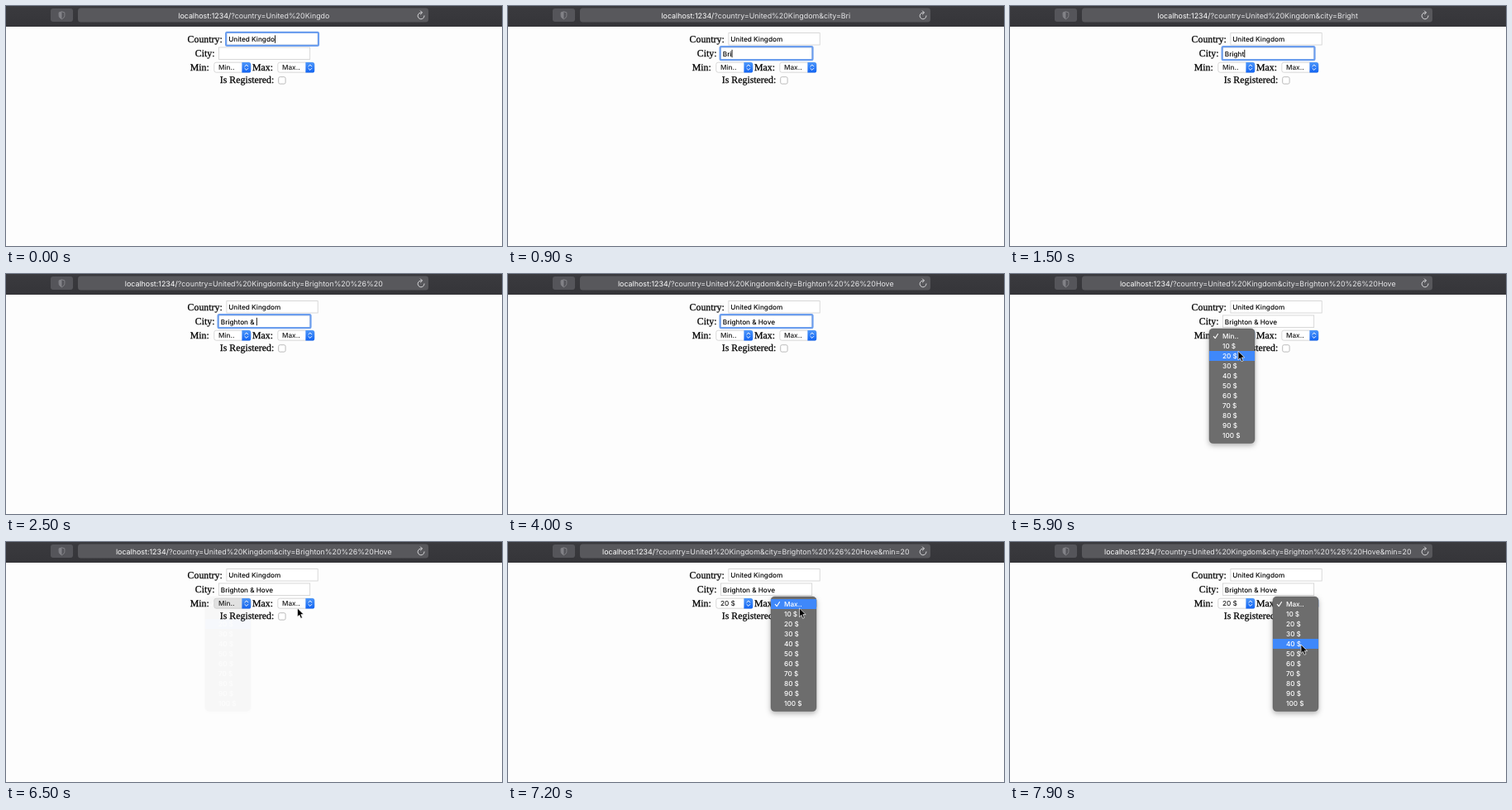
An HTML page that plays this animation: 600 px wide and 290 px high, repeating every 8 s.

```html
<!DOCTYPE html>
<html lang="en">
<head>
<meta charset="utf-8">
<title>Filter form</title>
<style>
html, body { margin: 0; width: 100%; height: 100%; overflow: hidden; background: #fdfdfd; }
svg { display: block; width: 600px; height: 290px; }
text { white-space: pre; text-rendering: geometricPrecision; font: 500 8.2px Inter, "Liberation Sans", sans-serif; fill: #000; }
.label { font: 11.85px "Liberation Serif", serif; stroke: #000; stroke-width: .25; }
.url { font-size: 8.88px; font-weight: 400; fill: #e6e6e8; text-anchor: middle; }
.host { fill: #fff; }
.value { fill: #1c1c1c; }
.menu text { fill: #fff; }
.box { fill: #fff; stroke: #cfcfcf; stroke-width: .8; }
.ring { fill: none; stroke: #6c9eee; stroke-width: 2.2; }
.line { fill: none; stroke-linecap: round; stroke-linejoin: round; }
</style>
</head>
<body>
<svg viewBox="0 0 600 290">
  <defs>
    <linearGradient id="bar" x2="0" y2="1">
      <stop offset="0" stop-color="#3a3a3e"/><stop offset="1" stop-color="#353539"/>
    </linearGradient>
    <linearGradient id="blue" x2="0" y2="1">
      <stop offset="0" stop-color="#4f98fa"/><stop offset="1" stop-color="#1264f2"/>
    </linearGradient>
    <filter id="shadow" x="-30%" y="-15%" width="160%" height="135%">
      <feDropShadow dx="0" dy="2.5" stdDeviation="3" flood-color="#000" flood-opacity=".3"/>
    </filter>
  </defs>

  <rect width="600" height="290" fill="#fdfdfd"/>
  <rect width="600" height="25" fill="url(#bar)"/>
  <rect x="54" y="3" width="27" height="16" rx="3" fill="#55555a"/>
  <path d="M67.5 6.8l3.4 1.1v3.4c0 2.2-1.5 3.6-3.4 4.5-1.9-.9-3.4-2.3-3.4-4.5V7.9z" fill="none" stroke="#8e8e93" stroke-width=".8"/>
  <path d="M67.5 6.8v9c-1.9-.9-3.4-2.3-3.4-4.5V7.9z" fill="#828287"/>
  <rect x="87" y="2.5" width="424" height="17" rx="3.5" fill="#58585c"/>
  <text class="url" x="299.8" y="15.2"><tspan class="host">localhost:1234/</tspan><tspan id="query"></tspan></text>
  <path class="line" d="M503 8.1a3.9 3.9 0 1 0 3 3.8M501.4 5.9l2.1 2.1-2.1 2.1" stroke="#e4e4e6" stroke-width=".9"/>

  <text class="label" x="219.6" y="44">Country:</text>
  <text class="label" x="228.8" y="61">City:</text>
  <text class="label" x="222.8" y="77.6">Min:</text>
  <text class="label" x="298" y="77.6">Max:</text>
  <text class="label" x="258.8" y="93.4">Is Registered:</text>
  <rect class="box" x="329.7" y="85.7" width="8.4" height="8.4" rx="1.8" style="stroke:#aaa"/>

  <g id="fields"></g>
  <rect id="caret" width=".9" height="9.4" fill="#000"/>
  <g id="selects"></g>
  <g id="menus"></g>
  <path id="arrow" d="M0 0v10.6l2.4-2.3 1.7 4 1.9-.8-1.7-3.9h3.4z" fill="#000" stroke="#fff" stroke-width=".7" stroke-linejoin="round"/>
</svg>
<script>
const LOOP = 8000, STEP = 100, GAP = 77, ROW = 12, TOP = 69;
const $ = id => document.getElementById(id);
const add = (parent, html) => {
  parent.insertAdjacentHTML("beforeend", html);
  return parent.lastElementChild;
};
const show = (el, on) => el.setAttribute("visibility", on ? "visible" : "hidden");
const within = (t, a, b) => t >= a && t < b;

const makeField = (x, y) => {
  const g = add($("fields"), `<g>
    <rect class="box" x="${x}" y="${y}" width="110.3" height="14.4"/>
    <rect class="ring" x="${x - .8}" y="${y - .8}" width="111.9" height="16" rx="1.4"/>
    <text x="${x + 2.4}" y="${y + 10.5}"></text></g>`);
  return { x: x + 2.4, y, ring: g.children[1], text: g.children[2] };
};

const makeSelect = (i, name) => {
  const g = add($("selects"), `<g transform="translate(${i * GAP} 0)">
    <rect class="box" x="251.8" y="68.2" width="44" height="12" rx="2.4"/>
    <path d="M285.4 67.9h8.2a2.6 2.6 0 0 1 2.6 2.6v7.4a2.6 2.6 0 0 1-2.6 2.6h-8.2z" fill="url(#blue)"/>
    <path class="line" d="M288.9 72.9l1.9-1.9 1.9 1.9M288.9 75.5l1.9 1.9 1.9-1.9" stroke="#fff"/>
    <text class="value" x="257" y="77.4">${name}</text></g>`);
  return { face: g.children[0], text: g.children[3] };
};

const makeMenu = (i, name) => {
  const rows = [name, ...Array.from({ length: 10 }, (_, n) => `${(n + 1) * 10} $`)];
  const g = add($("menus"), `<g class="menu" transform="translate(${i * GAP} 0)">
    <rect x="241" y="66" width="55" height="138.5" rx="4.5" fill="#6d6d6d" stroke="#5b5b5b" stroke-width=".5" filter="url(#shadow)"/>
    <rect x="241" y="${TOP}" width="55" height="${ROW}" fill="#3f88fa"/>
    <path class="line" d="M246.3 75.4l1.9 2.3 3.3-5.2" stroke="#fff" stroke-width="1.1"/>
    ${rows.map((r, n) => `<text x="257" y="${78 + n * ROW}">${r}</text>`).join("")}</g>`);
  return { g, mark: g.children[1] };
};

const country = makeField(266.9, 32.6), city = makeField(257.4, 50);
const min = makeSelect(0, "Min.."), max = makeSelect(1, "Max..");
const minMenu = makeMenu(0, "Min.."), maxMenu = makeMenu(1, "Max..");

const CITY = "Brighton & Hove";
const keys = [600, 800, 900, 1200, 1300, 1500, 1700, 1900, 2100, 2300, 2500, 2600, 2800, 3000, 3200];

// time, x, y of the pointer tip
const path = [
  [4100, 288, 66], [4300, 277, 71], [5400, 277, 76], [5600, 276, 84], [5900, 276, 93.3],
  [6000, 276, 97.5], [6200, 276, 97.5], [6300, 340, 86], [6500, 352.5, 80],
  [7400, 352.5, 80], [7700, 352, 109], [7900, 352, 124]
];

function pointer(t) {
  const i = path.findIndex(p => p[0] > t);
  if (i < 0) return path[path.length - 1].slice(1);
  const a = path[Math.max(i - 1, 0)], b = path[i];
  const k = Math.max(0, (t - a[0]) / (b[0] - a[0]));
  return [a[1] + (b[1] - a[1]) * k, a[2] + (b[2] - a[2]) * k];
}

function drawMenu(menu, opacity, y, lit) {
  show(menu.g, opacity > 0);
  menu.g.setAttribute("opacity", opacity);
  const row = Math.max(0, Math.floor((y - TOP) / ROW));
  menu.mark.setAttribute("y", TOP + row * ROW);
  menu.mark.setAttribute("opacity", lit ? 1 : 0);
}

function draw(t) {
  const land = t < 100 ? "United Kingdo" : "United Kingdom";
  const town = CITY.slice(0, keys.filter(k => k <= t).length);
  const chosen = t >= 6700;
  country.text.textContent = land;
  city.text.textContent = town;
  $("query").textContent = "?country=" + encodeURIComponent(land) +
    (town && "&city=" + encodeURIComponent(town)) + (chosen ? "&min=20" : "");

  show(country.ring, t < 300);
  show(city.ring, within(t, 300, 4200));
  const field = t < 300 ? country : city;
  const end = field.text.textContent ? field.text.getComputedTextLength() : 0;
  $("caret").setAttribute("x", field.x + end + .1);
  $("caret").setAttribute("y", field.y + 2.8);
  show($("caret"), t < 3600 || within(t, 4100, 4200));

  min.text.textContent = chosen ? "20 $" : "Min..";
  min.face.style.fill = within(t, 4300, 6700) ? "#e6e6e6" : "";
  max.face.style.fill = t >= 6900 ? "#e6e6e6" : "";

  const [x, y] = pointer(t);
  const fade = t < 6400 ? 1 : t < 6500 ? .5 : .03;
  drawMenu(minMenu, within(t, 4600, 6600) ? fade : 0, t < 6200 ? y : 97, !within(t, 6100, 6200));
  drawMenu(maxMenu, t >= 7000 ? 1 : 0, y, true);
  $("arrow").setAttribute("transform", `translate(${x} ${y})`);
  show($("arrow"), t >= 4100);
}

const start = performance.now();
function tick() {
  const t = (performance.now() - start) % LOOP;
  draw(Math.floor(t / STEP) * STEP);
  requestAnimationFrame(tick);
}
tick();
</script>
</body>
</html>
```
